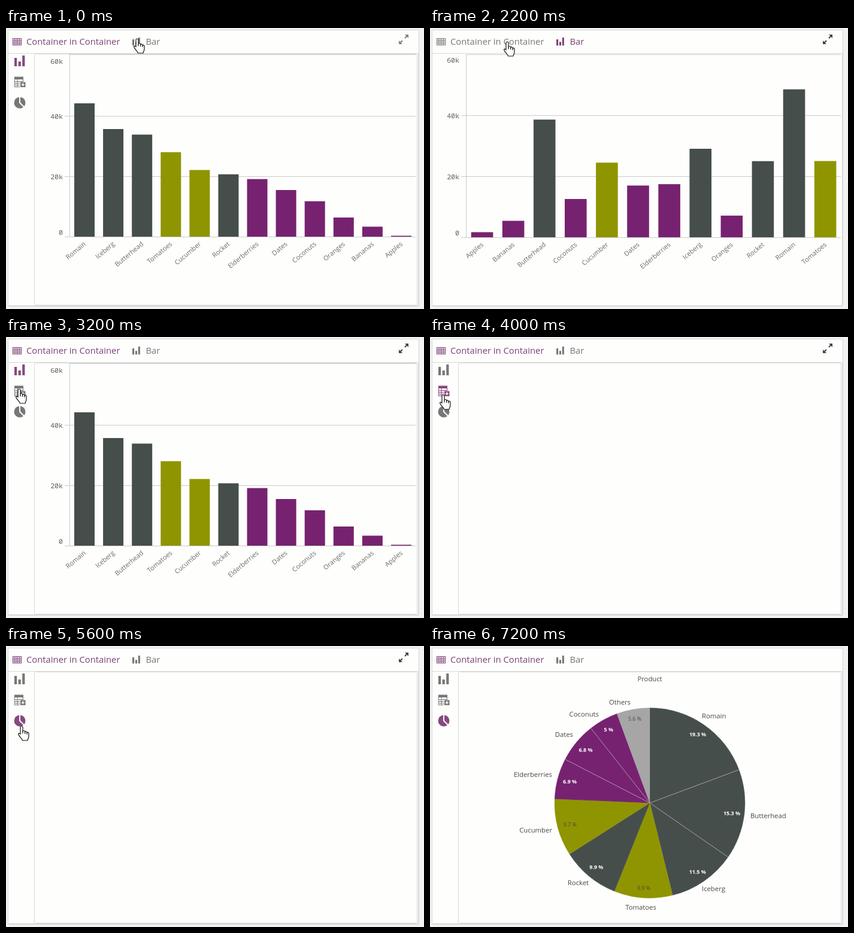
An HTML page for the animation above (7.8 s loop, 698x470 px).

```html
<!DOCTYPE html>
<html lang="en">
<head>
<meta charset="utf-8">
<title>Nested chart container</title>
<style>
html, body { margin: 0; width: 100%; height: 100%; overflow: hidden; background: #f2f2f3; }
svg { display: block; }
text { font-family: "Open Sans", "Noto Sans", sans-serif; }
.tab { font-size: 14.8px; fill: currentColor; }
.axis { font: 11.6px "Noto Sans Mono", "DejaVu Sans Mono", monospace; fill: #606060; text-anchor: end; }
.tick { font-size: 11px; fill: #6c6c6c; text-anchor: end; }
.name { font-size: 11.3px; fill: #484848; }
.share { font-size: 8.9px; font-weight: 700; fill: #fff; text-anchor: middle; }
.share.dark { font-weight: 400; fill: #454a40; }
.grid { stroke: #cbcbcb; fill: none; }
.frame { stroke: #d9d9d9; fill: none; }
use, .icon { fill: currentColor; stroke: none; }

/* One 200 ms step is 2.564% of the loop. */
.anim { animation: 7.8s step-end infinite; }
#outerTab, #innerTab { color: #777; }
#outerTab { animation-name: outerTab; }
#innerTab { animation-name: innerTab; }
#panel { animation-name: panel; }
#barIcon { animation-name: barIcon; }
#tableIcon { animation-name: tableIcon; }
#pieIcon { animation-name: pieIcon; }
#sorted { animation-name: sortedShow; }
#sorted .bars { animation-name: sortedGrow; }
#plain { animation-name: plainShow; }
#plain .bars { animation-name: plainGrow; }
#sweep { animation-name: sweep; }
#pieText { animation-name: pieText; }
#expand { animation-name: expand; }
#hand { animation-name: hand; }

@keyframes outerTab { 0%, 33.33% { color: #7c4176; } 12.82% { color: #777; } 100% { color: #7c4176; } }
@keyframes innerTab { 0%, 33.33%, 100% { color: #777; } 12.82% { color: #7c4176; } }
@keyframes panel { 0%, 33.33%, 100% { opacity: 1; } 12.82% { opacity: 0; } }
@keyframes barIcon { 0% { color: #874a7f; } 51.28%, 100% { color: #777; } }
@keyframes tableIcon { 0%, 71.79%, 100% { color: #777; } 51.28% { color: #874a7f; } }
@keyframes pieIcon { 0% { color: #777; } 71.79%, 100% { color: #874a7f; } }
@keyframes sortedShow { 0%, 35.89% { opacity: 1; } 12.82%, 51.28%, 100% { opacity: 0; } }
@keyframes sortedGrow {
  0%, 41.02%, 100% { transform: none; }
  35.89% { transform: scaleY(.5); }
  38.46% { transform: scaleY(.88); }
}
@keyframes plainShow { 0%, 33.33%, 100% { opacity: 0; } 15.38% { opacity: 1; } }
@keyframes plainGrow {
  0%, 20.51%, 100% { transform: none; }
  15.38% { transform: scaleY(.5); }
  17.94% { transform: scaleY(.88); }
}
@keyframes sweep {
  0% { stroke-dasharray: 0 101; }
  79.48% { stroke-dasharray: 35 101; }
  82.05% { stroke-dasharray: 82 101; }
  84.61%, 100% { stroke-dasharray: 101 0; }
}
@keyframes pieText { 0% { opacity: 0; } 84.61%, 100% { opacity: 1; } }
@keyframes expand {
  0% { color: #808080; opacity: 1; }
  2.56% { color: #5c5c5c; opacity: 1; }
  5.12% { color: #444; opacity: 1; }
  89.74% { color: #444; opacity: .5; }
  92.3%, 100% { color: #444; opacity: 0; }
}
@keyframes hand {
  0% { transform: translate(219px, 18px); }
  2.56% { transform: translate(224px, 17px); }
  5.12% { transform: translate(229px, 16px); }
  7.69% { transform: translate(231px, 16px); }
  20.51% { transform: translate(214px, 18px); }
  23.07% { transform: translate(164px, 21px); }
  25.64% { transform: translate(129px, 23px); }
  35.89% { transform: translate(96px, 38px); }
  38.46% { transform: translate(44px, 70px); }
  41.02% { transform: translate(22px, 87px); }
  43.58% { transform: translate(22px, 91px); }
  46.15% { transform: translate(22px, 95px); }
  48.71% { transform: translate(22px, 97px); }
  61.53% { transform: translate(24px, 116px); }
  64.1% { transform: translate(26px, 134px); opacity: 1; }
  84.61% { transform: translate(29px, 205px); }
  87.17% { transform: translate(33px, 320px); }
  89.74% { transform: translate(36px, 438px); opacity: 1; }
  92.3%, 100% { transform: translate(36px, 438px); opacity: 0; }
}
</style>
</head>
<body>
<svg width="698" height="470" viewBox="0 0 698 470">
  <defs>
    <path id="barGlyph" d="M0 4h4.2v14H0zM6.6 10h4.2v8H6.6zM13.2 0h4.2v18h-4.2z"/>
    <mask id="pieMask" maskUnits="userSpaceOnUse" x="200" y="95" width="335" height="335">
      <circle id="sweep" class="anim" cx="367" cy="262.5" r="81" pathLength="100" fill="none"
        stroke="#fff" stroke-width="162" transform="rotate(-90 367 262.5)"/>
    </mask>
  </defs>

  <rect x="3.5" y="3.5" width="686" height="462" rx="1" fill="#fefefd" stroke="#d6d6d7"/>
  <path class="frame" d="M4 42.5H689M4 464.5H689M688.5 43V464"/>

  <g id="outerTab" class="anim">
    <path d="M11.5 17V29M14.9 17V29M18.5 17V29M22.1 17V29M25.6 17V29M11 17.5H26M11 20.4H26M11 23.1H26M11 25.8H26M11 28.5H26"
      stroke="currentColor" fill="none"/>
    <text class="tab" x="34" y="28">Container in Container</text>
  </g>
  <g id="innerTab" class="anim">
    <use href="#barGlyph" transform="translate(211 16) scale(.74 .73)"/>
    <text class="tab" x="233.5" y="28">Bar</text>
  </g>
  <g id="expand" class="anim">
    <path class="icon" d="M666 11h6v6zM656 21v6h6z"/>
    <path d="M670 13L666 17M658 25L662 21" stroke="currentColor" stroke-width="2"/>
  </g>

  <g id="panel" class="anim">
    <rect class="frame" x="47.5" y="43.5" width="639" height="420" rx="1"/>
    <g id="barIcon" class="anim"><use href="#barGlyph" transform="translate(14 46)"/></g>
    <g id="tableIcon" class="anim">
      <path class="icon" d="M14 81.5h15v4.5H14zM24 90.5h8.5v8.5H24z"/>
      <path d="M14.5 86V99M19 86V99M28.5 86V90M14 89.5H29M14 92.5H23M14 95.5H23M14 98.5H23" stroke="currentColor" fill="none"/>
      <path d="M28.3 92.2v5M25.8 94.7h5" stroke="#fff" stroke-width="1.5"/>
    </g>
    <g id="pieIcon" class="anim">
      <circle class="icon" cx="23" cy="125" r="9.5"/>
      <path d="M23 115V125L30.5 132.5" stroke="#fefefd" stroke-width="1.9" fill="none"/>
    </g>
  </g>

  <g id="sorted" class="anim"></g>
  <g id="plain" class="anim"></g>
  <g id="slices" mask="url(#pieMask)"></g>
  <g id="pieText" class="anim">
    <text class="name" x="367" y="59" text-anchor="middle">Product</text>
  </g>

  <g id="hand" class="anim" stroke="#111" stroke-width="1.2" stroke-linejoin="round">
    <path fill="#fff" d="M-2 2a2 2 0 0 1 4 0v7c0-2 3.6-2 3.6 .2v.9c0-1.8 3.4-1.6 3.4 .4v1c0-1.6 3-1.4 3 .5v5c0 3-1.5 3.5-2 7H1.5c-.5-3-5-6-6.5-9.5-1.3-2.4 1-3.5 3-1z"/>
    <path fill="none" d="M2 9v3.5M5.6 10v3M9 11.5v2.5"/>
  </g>
</svg>
<script>
const DARK = '#464e4c', OLIVE = '#8f9500', PURPLE = '#772270', GREY = '#a6a6a6';
const leafy = ['Romain', 'Iceberg', 'Butterhead', 'Rocket'];
const olive = ['Tomatoes', 'Cucumber'];
const colorOf = name => leafy.includes(name) ? DARK
  : olive.includes(name) ? OLIVE
  : name === 'Others' ? GREY : PURPLE;

function add(parent, tag, attrs, text) {
  const el = document.createElementNS('http://www.w3.org/2000/svg', tag);
  for (const key in attrs) el.setAttribute(key, attrs[key]);
  if (text) el.textContent = text;
  return parent.appendChild(el);
}

function barChart(id, { left, right, base, step, first, pitch, width, tops }) {
  const chart = document.getElementById(id);
  const top = 44.5;
  add(chart, 'path', { class: 'grid', d: `M${left + .5} ${top}V${base}M${left} ${top}H${right}` });
  ['0', '20k', '40k', '60k'].forEach((label, i) => {
    const y = Math.floor(base - i * step) + .5;
    if (i < 3) add(chart, 'path', { class: 'grid', d: `M${left - 8} ${y}H${right}` });
    const shift = i === 0 ? -3.5 : i === 3 ? 13 : 4.5;
    add(chart, 'text', { class: 'axis', x: left - 11, y: y + shift }, label);
  });
  const holder = add(chart, 'g', { transform: `translate(0 ${base})` });
  const bars = add(holder, 'g', { class: 'bars anim' });
  Object.entries(tops).forEach(([name, y], i) => {
    const x = first + i * pitch;
    add(bars, 'rect', { x, y: y - base, width, height: base - y, fill: colorOf(name) });
    add(chart, 'text', {
      class: 'tick',
      transform: `translate(${x + width / 2 + 3} ${base + 13.5}) rotate(-40)`
    }, name);
  });
}

barChart('sorted', {
  left: 106, right: 684, base: 349, step: 100.8, first: 114, pitch: 48.09, width: 34,
  tops: {
    Romain: 126, Iceberg: 169, Butterhead: 178.3, Tomatoes: 207.7, Cucumber: 237.5, Rocket: 244.7,
    Elderberries: 252.7, Dates: 271, Coconuts: 289.8, Oranges: 317, Bananas: 332.3, Apples: 347.5
  }
});
barChart('plain', {
  left: 60, right: 686, base: 350, step: 101.7, first: 68.7, pitch: 52.1, width: 36.6,
  tops: {
    Apples: 341.5, Bananas: 322.5, Butterhead: 153.2, Coconuts: 286, Cucumber: 225.2, Dates: 263.5,
    Elderberries: 261.2, Iceberg: 202, Oranges: 313.8, Rocket: 222.7, Romain: 102.6, Tomatoes: 222.5
  }
});

// name, share, label x, label baseline, anchor
const shares = [
  ['Romain', 19.3, 454, 121, 'start'], ['Butterhead', 15.3, 535, 288, 'start'],
  ['Iceberg', 11.5, 454, 410, 'start'], ['Tomatoes', 9.9, 352, 441, 'middle'],
  ['Rocket', 9.9, 265, 400, 'end'], ['Cucumber', 9.7, 204, 312, 'end'],
  ['Elderberries', 6.9, 204, 219, 'end'], ['Dates', 6.8, 239, 152, 'end'],
  ['Coconuts', 5, 282, 118, 'end'], ['Others', 5.6, 335, 98, 'end']
];
const slices = document.getElementById('slices');
const pieText = document.getElementById('pieText');
const total = shares.reduce((sum, s) => sum + s[1], 0);
const polar = (part, r) => {
  const a = part / total * 2 * Math.PI;
  return [367 + r * Math.sin(a), 262.5 - r * Math.cos(a)];
};

let from = 0;
const seams = [];
shares.forEach(([name, share, x, y, anchor], i) => {
  const to = from + share, fill = colorOf(name);
  add(slices, 'path', {
    d: `M367 262.5L${polar(from, 159)}A159 159 0 0 1 ${polar(to, 159)}Z`,
    fill, stroke: fill, 'stroke-width': .4
  });
  if (i && colorOf(shares[i - 1][0]) === fill) seams.push(from);
  const mid = from + share / 2;
  const r = 138 + 5 * Math.cos(mid / total * 2 * Math.PI) ** 4;
  const [px, py] = polar(mid, r);
  const dark = fill === OLIVE || fill === GREY;
  add(pieText, 'text', { class: dark ? 'share dark' : 'share', x: px, y: py + 3.3 }, `${share} %`);
  add(pieText, 'text', { class: 'name', x, y, 'text-anchor': anchor }, name);
  from = to;
});
seams.forEach(s => add(slices, 'path', {
  d: `M367 262.5L${polar(s, 159)}`, stroke: '#b5b0b5', 'stroke-width': .8
}));
</script>
</body>
</html>
```
